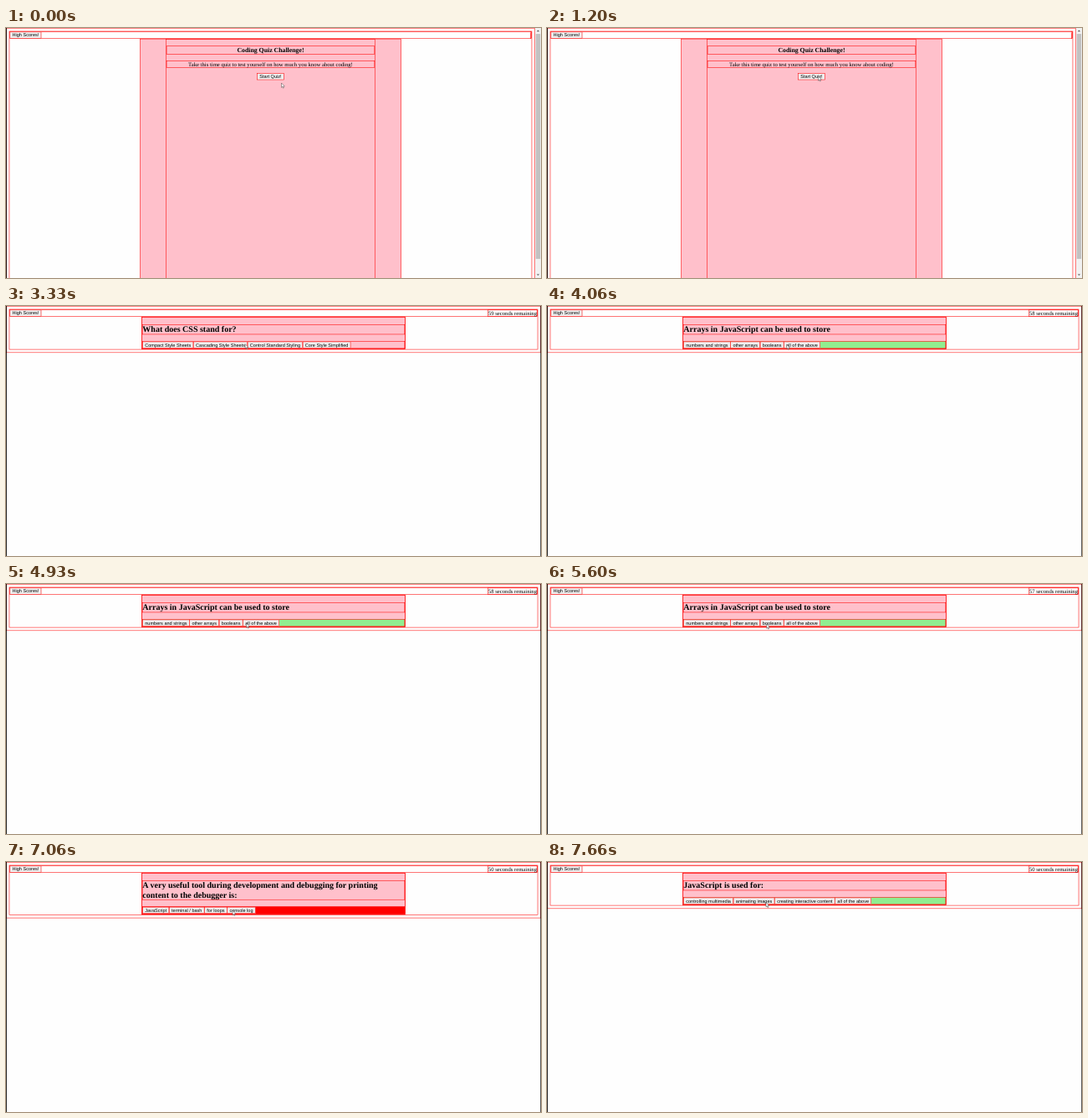
An HTML page with a canvas for the animation above (8 s loop, 640 by 300 pixels).

```html
<!DOCTYPE html>
<html lang="en">
<head>
<meta charset="utf-8">
<title>Coding quiz</title>
<style>
  html, body { margin: 0; width: 100%; height: 100%; overflow: hidden; background: #fefefe; }
  canvas { display: block; }
</style>
</head>
<body>
<canvas id="stage" width="640" height="300"></canvas>
<script>
const ctx = document.getElementById('stage').getContext('2d');
const LOOP = 8000, FPS = 15;
const SCALE = 5 / 12; // page is laid out 1536 x 720
const SANS = '13.333px "Liberation Sans", Arial, sans-serif';
const serif = (size, weight = '') => `${weight} ${size}px "Liberation Serif", Times, serif`;
const PINK = '#ffc0cb';

const questions = [
  { at: 2000, lines: ['What does CSS stand for?'],
    answers: ['Compact Style Sheets', 'Cascading Style Sheets', 'Control Standard Styling', 'Core Style Simplified'] },
  { at: 3800, lines: ['Arrays in JavaScript can be used to store'], result: '#90ee90',
    answers: ['numbers and strings', 'other arrays', 'booleans', 'all of the above'] },
  { at: 5933, lines: ['A very useful tool during development and debugging for printing', 'content to the debugger is:'], result: '#f00',
    answers: ['JavaScript', 'terminal / bash', 'for loops', 'console log'] },
  { at: 7400, lines: ['JavaScript is used for:'], result: '#90ee90',
    answers: ['controlling multimedia', 'animating images', 'creating interactive content', 'all of the above'] }
];

// [time, seconds left]
const ticks = [[3000, 59], [4000, 58], [5000, 57], [6066, 51], [7066, 50]];

// [time, x, y] of the pointer tip
const path = [
  [0, 329.5, 66], [133, 330, 66.5], [467, 330, 66.5], [600, 329.5, 66], [800, 329.5, 66],
  [1200, 324.5, 57.8], [2333, 324.5, 57.8], [3200, 286, 45.5], [3533, 286.5, 46],
  [3933, 286.5, 46], [4467, 288, 47], [4867, 288, 47], [5733, 261, 48], [6200, 261, 48],
  [6533, 273, 63], [6667, 273, 63], [7133, 271, 58], [7333, 271, 58], [7667, 262, 48.5]
];

const latest = (list, t, time) => list.filter(item => time(item) <= t).pop();

function fill(color, x, y, w, h) {
  ctx.fillStyle = color;
  ctx.fillRect(x, y, w, h);
}

function box(x, y, w, h, color) {
  if (color) fill(color, x, y, w, h);
  ctx.strokeRect(x + .5, y + .5, w - 1, h - 1);
}

function text(str, x, y, font, align = 'left') {
  ctx.font = font;
  ctx.textAlign = align;
  ctx.fillStyle = '#000';
  ctx.fillText(str, x, y);
}

function textWidth(str, font) {
  ctx.font = font;
  return ctx.measureText(str).width;
}

// Draws a button and returns its width
function button(label, x, y) {
  const w = textWidth(label, SANS) + 14;
  box(x, y, w, 19, '#efefef');
  text(label, x + 7, y + 14, SANS);
  return w;
}

function frame(width, bottom) {
  box(0, 0, width, bottom);
  box(9, 9, width - 18, bottom - 18);
  box(10, 10, width - 20, 21);
  button('High Scores!', 11, 11);
}

function timer(width, t) {
  const tick = latest(ticks, t, k => k[0]);
  const label = tick ? `${tick[1]} seconds remaining` : '';
  const w = textWidth(label, serif(16)) + 2;
  box(width - 11 - w, 11, w, 19);
  if (label) text(label, width - 10 - w, 26.5, serif(16));
}

function arrow(cx, y, dir) {
  ctx.fillStyle = '#505050';
  ctx.beginPath();
  ctx.moveTo(cx - 4, y);
  ctx.lineTo(cx + 4, y);
  ctx.lineTo(cx, y + 4 * dir);
  ctx.fill();
}

function startPage(t) {
  const width = 1519, mid = width / 2;
  fill('#f1f1f1', width, 0, 17, 720);
  fill('#c1c1c1', width + 2, 17, 13, 648);
  arrow(width + 8.5, 10, -1);
  arrow(width + 8.5, 709, 1);
  box(384.75, 31, 749.5, 900, PINK);
  box(mid - 300, 32, 600, 900);
  box(mid - 299, 51.7, 598, 24);
  box(mid - 299, 94.4, 598, 20);
  frame(width, 900);
  timer(width, t);
  text('Coding Quiz Challenge!', mid, 69.7, serif(18.72, 'bold'), 'center');
  text('Take this time quiz to test yourself on how much you know about coding!', mid, 110, serif(16), 'center');
  button('Start Quiz!', mid - 38.5, 130.4);
}

function questionPage(q, t) {
  const width = 1536, tall = q.lines.length * 27;
  const top = 74.5 + tall;
  box(389, 31, 758, top + 23 - 31, PINK);
  box(390, 32, 756, top + 22 - 32);
  box(391, 53, 754, tall + 2);
  box(391, top, 754, 21, q.result);
  frame(width, top + 33);
  timer(width, t);
  q.lines.forEach((line, i) => text(line, 392, 75.5 + 27 * i, serif(24, 'bold')));
  q.answers.reduce((x, label) => x + button(label, x, top + 1), 392);
  fill('#000', 1534.5, 0, 1.5, 720);
}

function pointer(t) {
  const next = path.findIndex(p => p[0] > t);
  const b = path[next < 0 ? path.length - 1 : next];
  const a = next < 0 ? b : path[next - 1];
  const u = a === b ? 0 : (t - a[0]) / (b[0] - a[0]);
  const ease = u * u * (3 - 2 * u);
  const x = a[1] + (b[1] - a[1]) * ease, y = a[2] + (b[2] - a[2]) * ease;
  const shape = new Path2D('M0 0V5.4L1.2 4.3L2 6.2L2.8 5.8L2 4H3.8Z');
  ctx.save();
  ctx.translate(x, y);
  ctx.fillStyle = '#fff';
  ctx.fill(shape);
  ctx.strokeStyle = '#222';
  ctx.lineWidth = .4;
  ctx.stroke(shape);
  ctx.restore();
}

function draw(now) {
  const t = Math.floor((now % LOOP + 7) * FPS / 1000) * 1000 / FPS;
  const q = latest(questions, t, item => item.at);
  ctx.setTransform(SCALE, 0, 0, SCALE, 0, 0);
  ctx.textRendering = 'geometricPrecision';
  ctx.strokeStyle = '#f00';
  ctx.lineWidth = 1.3;
  fill('#fefefe', 0, 0, 1536, 720);
  if (q) questionPage(q, t);
  else startPage(t);
  fill('#000', 0, 0, 2, 720);
  ctx.setTransform(1, 0, 0, 1, 0, 0);
  pointer(t);
}

const begin = performance.now();
function loop() {
  draw(performance.now() - begin);
  requestAnimationFrame(loop);
}
loop();
</script>
</body>
</html>
```
